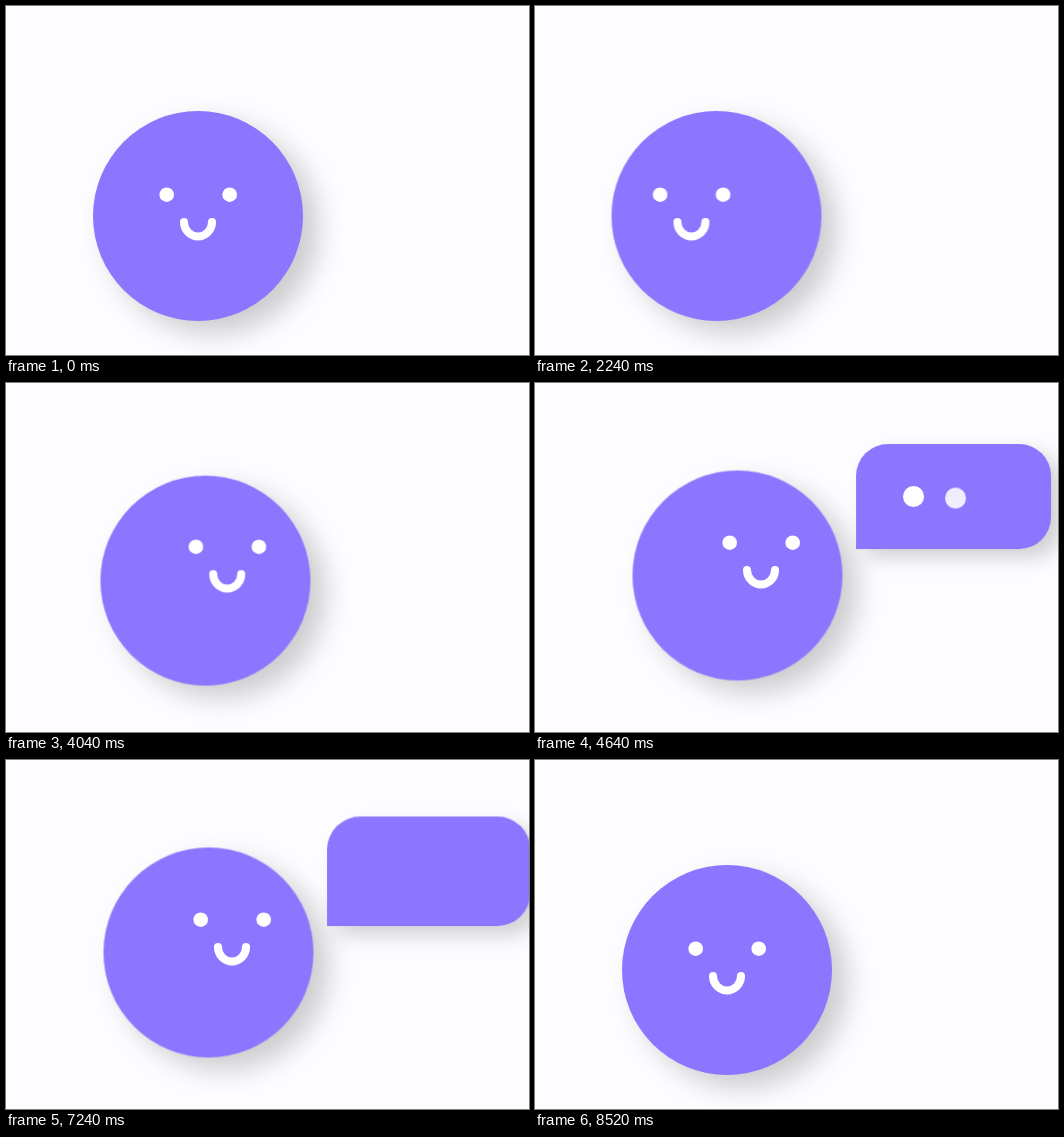
Write an HTML page that moves like this. It is 523 px wide and 349 px high and loops after 8.56 s.

```html
<!DOCTYPE html>
<html lang="en">
<head>
<meta charset="utf-8">
<title>Chatty ball</title>
<style>
  html, body { margin: 0; width: 100%; height: 100%; overflow: hidden; background: #fdfdff; }
  #stage { position: relative; width: 523px; height: 349px; overflow: hidden; }
  #stage > * { position: absolute; }
  #body, #bubble { background: #8c75ff; }
  #body {
    left: 87px; top: 105px; width: 210px; height: 210px; border-radius: 50%;
    box-shadow: 15px 12.5px 28px rgba(0, 0, 0, .2);
  }
  #bubble {
    left: 320.5px; top: 61px; width: 195px; height: 105px;
    border-radius: 32px 32px 32px 0; transform-origin: 0 100%;
    box-shadow: 11px 9px 20px rgba(0, 0, 0, .18);
  }
  .dot {
    position: absolute; top: 41.5px; width: 21px; height: 21px;
    border-radius: 50%; background: #fff;
  }
  #face { left: 0; top: 0; overflow: visible; }
  .eye { fill: #fff; transform-box: fill-box; transform-origin: center; }
  .mouth { fill: none; stroke: #fff; stroke-width: 8; stroke-linecap: round; }
</style>
</head>
<body>
<div id="stage">
  <div id="body"></div>
  <div id="bubble">
    <div class="dot" style="left:46.5px"></div>
    <div class="dot" style="left:88.5px"></div>
    <div class="dot" style="left:130.5px"></div>
  </div>
  <svg id="face" width="523" height="349">
    <circle class="eye" cx="160.7" cy="188.7" r="7.3"/>
    <circle class="eye" cx="223.7" cy="188.7" r="7.3"/>
    <path class="mouth" d="M178 216a14 14.5 0 0 0 28 0"/>
  </svg>
</div>
<script>
const LOOP = 8560;
const EASE = 'ease';
const OUT = 'cubic-bezier(.333,1,.667,1)';
const BACK_OUT = 'cubic-bezier(.333,1.45,.667,1)';
const BACK_IN = 'cubic-bezier(.333,0,.667,-.45)';

const move = (x, y) => ({ transform: `translate(${x}px, ${y}px)` });
const scale = (x, y) => ({ transform: `scale(${x}, ${y})` });

// steps: [start ms, end ms, pose, easing]; poses hold between steps
function track(el, pose, steps) {
  const frames = [{ offset: 0, ...pose }];
  for (const [start, end, next, easing = 'linear'] of steps) {
    frames.push({ offset: start / LOOP, ...pose, easing }, { offset: end / LOOP, ...next });
    pose = next;
  }
  frames.push({ offset: 1, ...pose });
  el.animate(frames, { duration: LOOP, iterations: Infinity }).startTime = 0;
}

// start, body duration, body position, face position
const moves = [
  [225, 500, [10.5, 0], [36.5, 0]],
  [1475, 600, [-10.5, 0], [-35.6, 0]],
  [2745, 460, [0, 0], [0, 0]],
  [3850, 458, [10.5, -17.5], [34, -29]],
  [7575, 370, [0, 0], [0, 0]],
];
track(document.getElementById('body'), move(0, 0),
  moves.map(([t, d, p]) => [t, t + d, move(...p), EASE]));
track(document.getElementById('face'), move(0, 0),
  moves.map(([t, d, , p]) => [t, t + d * .74, move(...p), EASE]));

const blinks = [660, 2060, 5960, 8340].flatMap(t => [
  [t, t + 90, scale(1, .1)],
  [t + 90, t + 180, scale(1, 1)],
]);
document.querySelectorAll('.eye').forEach(eye => track(eye, scale(1, 1), blinks));

track(document.getElementById('bubble'), scale(0, 0), [
  [4050, 4650, scale(1, 1), BACK_OUT],
  [7100, 7707, scale(0, 0), BACK_IN],
]);

const below = { ...move(0, 12.5), opacity: 0 };
const shown = { ...move(0, 0), opacity: 1 };
const above = { ...move(0, -35), opacity: 0 };
document.querySelectorAll('.dot').forEach((dot, i) => {
  const steps = [4422, 5942].flatMap(cycle => {
    const t = cycle + i * 120;
    return [
      [t, t + 200, shown, OUT],
      [t + 760, t + 960, above, OUT],
      [t + 1000, t + 1000, below],
    ];
  });
  track(dot, below, steps);
});

// all tracks share one clock that starts when the page loads
const now = document.timeline.currentTime ?? performance.now();
document.getAnimations().forEach(a => { a.startTime = now; });
</script>
</body>
</html>
```
